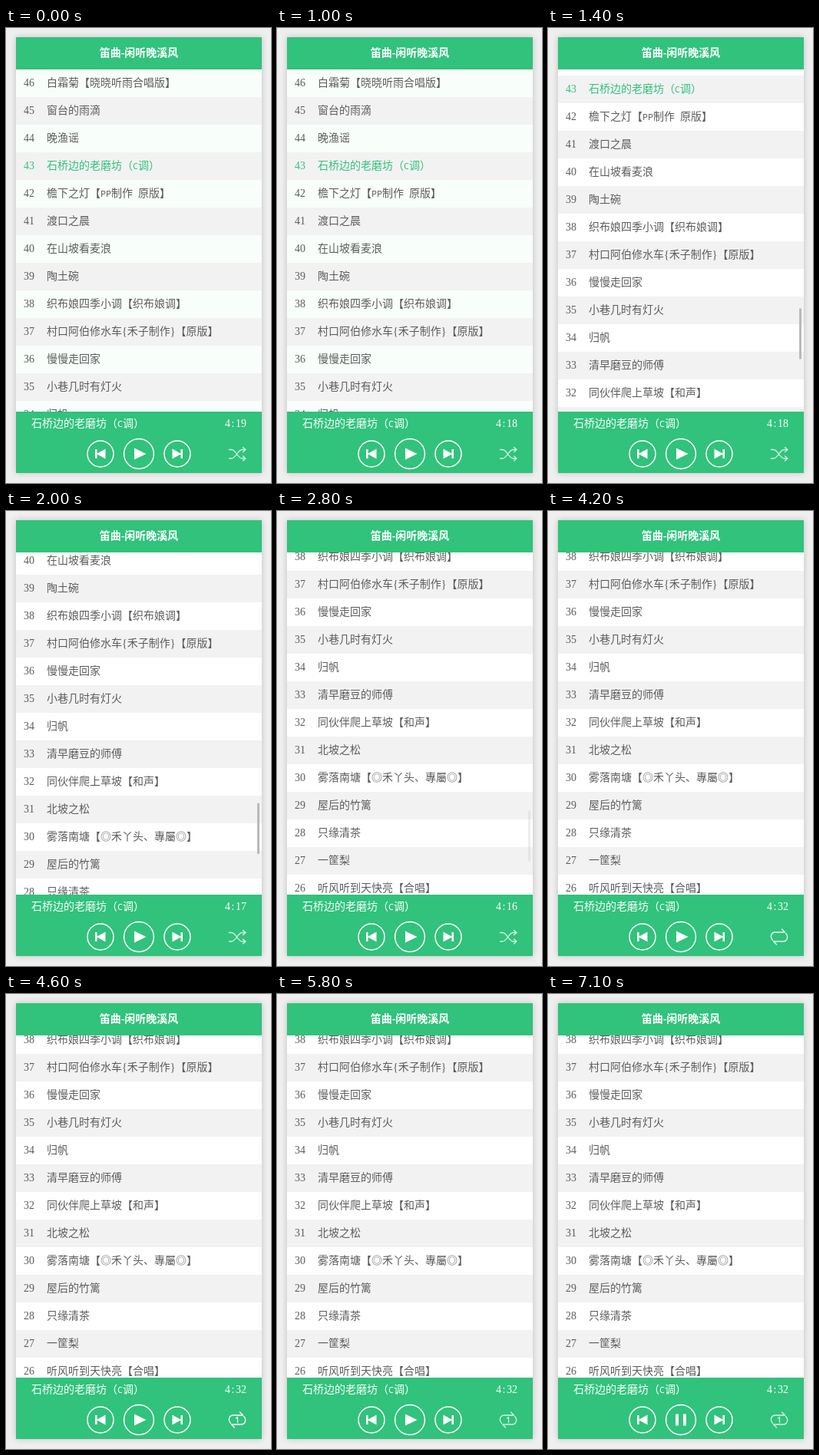
Recreate the animation shown at these times as an HTML page. Size 345 px wide and 593 px high, loop 8000 ms.

```html
<!DOCTYPE html>
<html lang="zh-CN">
<head>
<meta charset="utf-8">
<title>笛曲</title>
<style>
@property --scroll { syntax: "<number>"; inherits: true; initial-value: 0; }
html, body { margin: 0; width: 100%; height: 100%; overflow: hidden; }
body {
  position: relative;
  background: #efefef;
  font: 300 14px/36px "Liberation Serif", "Noto Sans CJK SC", "Noto Sans CJK", serif;
  text-spacing-trim: space-all;
  white-space: pre;
}
.card {
  position: absolute; left: 13px; top: 12px; width: 320px; height: 568px;
  overflow: hidden; background: #fff;
  box-shadow: 0 0 8px rgba(0, 0, 0, .2);
}
header, footer { position: absolute; left: 0; width: 100%; background: #31c27c; color: #fff; }
header { top: 0; height: 42px; line-height: 42px; text-align: center; font-weight: 700; }
footer { top: 488px; height: 80px; }
.view { position: absolute; top: 42px; width: 100%; height: 446px; overflow: hidden; }
.list { transform: translateY(calc(var(--scroll) * -1px)); }
.row { height: 36px; color: #5c5c5c; }
.row:nth-child(even) { background: #f2f2f2; }
.row.active { color: #31c27c; }
.num { position: absolute; left: 10px; }
.name { position: absolute; left: 40px; }
.latin { font: 11.67px/1 "Noto Sans Mono", monospace; }
.thumb {
  position: absolute; left: 314px; top: 298.5px; width: 3px; height: 66px;
  background: #b9b9b9; opacity: 0;
  transform: translateY(calc(var(--scroll) * .125px));
}
.song { position: absolute; left: 20px; top: -2px; }
.clock { position: absolute; left: 272px; top: 7px; height: 18px; line-height: 18px; overflow: hidden; }
.clock div { height: 18px; }
.clock i { font-style: normal; padding: 0 1.55px; }
svg { position: absolute; left: 0; top: 0; fill: none; stroke: #fff; stroke-width: 1.5; }
.solid { fill: #fff; stroke: none; }
.mode { stroke-width: 1.3; stroke-linecap: round; stroke-linejoin: round; }

.view, .list, .thumb, .ticks, .mode, .play, .pause { animation: 8s step-end infinite; }
.view { animation-name: scroll; }
.list { animation-name: tint; }
.thumb { animation-name: thumb; }
.ticks { animation-name: ticks; }
.shuffle { animation-name: shuffle; }
.loop { animation-name: loop; }
.single { animation-name: single; }
.play { animation-name: play; }
.pause { animation-name: pause; }

/* three wheel notches of 100px */
@keyframes scroll {
  0% { --scroll: 0; }
  15% { --scroll: 23; } 16.25% { --scroll: 77; } 17.5% { --scroll: 100; }
  21.25% { --scroll: 123; } 22.5% { --scroll: 177; } 23.75% { --scroll: 200; }
  25% { --scroll: 223; } 26.25% { --scroll: 277; } 27.5%, 100% { --scroll: 300; }
}
@keyframes tint { 0% { background: #f8fefa; } 15%, 100% { background: #fff; } }
@keyframes thumb {
  0% { opacity: 0; } 15% { opacity: 1; } 33.75% { opacity: .65; }
  35% { opacity: .25; } 36.25%, 100% { opacity: 0; }
}
@keyframes ticks {
  0% { transform: none; }
  12.5% { transform: translateY(-18px); }
  23.75% { transform: translateY(-36px); }
  35% { transform: translateY(-54px); }
  52.5%, 100% { transform: translateY(-72px); }
}
@keyframes shuffle { 0% { opacity: .8; } 36.25%, 100% { opacity: 0; } }
@keyframes loop { 0% { opacity: 0; } 36.25% { opacity: .9; } 56.25%, 100% { opacity: 0; } }
@keyframes single { 0% { opacity: 0; } 56.25% { opacity: 1; } 72.5%, 100% { opacity: .8; } }
@keyframes play { 0% { opacity: 1; } 87.5%, 100% { opacity: 0; } }
@keyframes pause { 0% { opacity: 0; } 87.5%, 100% { opacity: 1; } }
</style>
</head>
<body>
<div class="card">
  <div class="view"><div class="list"></div><div class="thumb"></div></div>
  <header>笛曲-闲听晚溪风</header>
  <footer>
    <div class="song">石桥边的老磨坊（<span class="latin">C</span>调）</div>
    <div class="clock"><div class="ticks"></div></div>
    <svg width="320" height="80" viewBox="13 500 320 80">
      <defs>
        <g id="skip">
          <circle r="17"/>
          <path class="solid" d="M-7-6h2.600v5.400L6.500-6.500v13L-4.400.6V6H-7z"/>
        </g>
        <path id="half" d="M292.500 559.500c-4-4-2-10.500 3.500-10.500h12.500M304.500 545l4 4"/>
        <g id="cycle">
          <use href="#half"/>
          <use href="#half" transform="rotate(180 301 555)"/>
        </g>
      </defs>
      <use href="#skip" transform="translate(123 555)"/>
      <use href="#skip" transform="translate(223 555) scale(-1 1)"/>
      <circle cx="173" cy="555" r="19.4"/>
      <path class="solid play" d="M167 547.500l15.500 7.500-15.500 7.500z"/>
      <path class="solid pause" d="M166 547.500h4v15h-4zM176 547.500h4v15h-4z"/>
      <path class="mode shuffle" d="M290.500 549.500h3c6 0 8 11.500 14 11.500h4.500M290.500 561h3c6 0 8-11.500 14-11.500h4.500M308.500 546.500l3.500 3-3.500 3M308.500 558l3.500 3-3.500 3"/>
      <use class="mode loop" href="#cycle"/>
      <g class="mode single"><use href="#cycle"/><path d="M299.500 553l2-1.500v7"/></g>
    </svg>
  </footer>
</div>
<script>
const FIRST = 46, ACTIVE = 43;
const songs = [
  "白霜菊【晓晓听雨合唱版】", "窗台的雨滴", "晚渔谣", "石桥边的老磨坊（C调）",
  "檐下之灯【PP制作  原版】", "渡口之晨", "在山坡看麦浪", "陶土碗",
  "织布娘四季小调【织布娘调】", "村口阿伯修水车{禾子制作}【原版】", "慢慢走回家",
  "小巷几时有灯火", "归帆", "清早磨豆的师傅", "同伙伴爬上草坡【和声】", "北坡之松",
  "雾落南塘【◎禾丫头、專屬◎】", "屋后的竹篱", "只缘清茶", "一筐梨", "听风听到天快亮【合唱】"
];
const latin = text => text.replace(/[A-Z]+/g, '<span class="latin">$&</span>');

document.querySelector(".list").innerHTML = songs.map((song, i) => {
  const num = FIRST - i;
  return `<div class="row${num === ACTIVE ? " active" : ""}"><span class="num">${num}</span><span class="name">${latin(song)}</span></div>`;
}).join("");

document.querySelector(".ticks").innerHTML =
  [19, 18, 17, 16, 32].map(s => `<div>4<i>:</i>${s}</div>`).join("");
</script>
</body>
</html>
```
